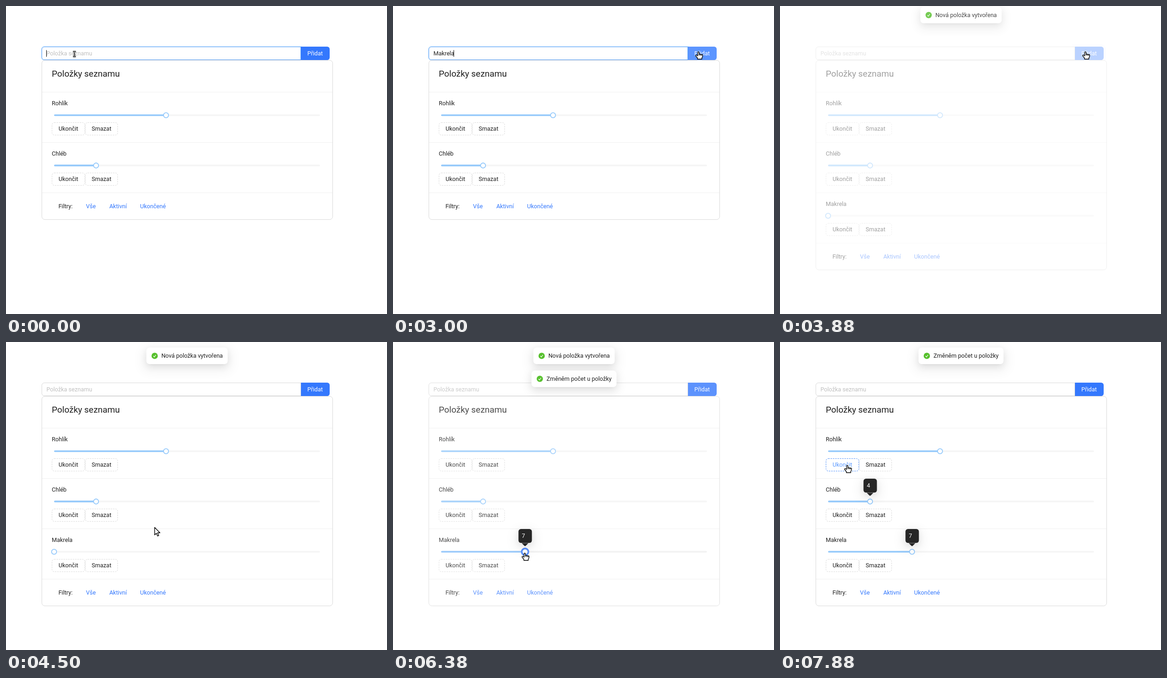
An HTML page that plays this animation: 824 px wide and 667 px high, repeating every 8 s.

```html
<!DOCTYPE html>
<html lang="cs">
<head>
<meta charset="utf-8">
<title>Položky seznamu</title>
<style>
html, body { margin: 0; width: 100%; height: 100%; overflow: hidden; background: #fff; }
svg { display: block; width: 824px; height: 667px; font: 12.6px Roboto, sans-serif; }
</style>
</head>
<body>
<svg id="stage" viewBox="0 0 824 667"></svg>
<script>
const LOOP = 8000;
const BLUE = '#3478fd', INK = '#1f1f1f', EDGE = '#d9d9d9', RULE = '#f0f0f0';
const ROW = 109;
const stage = document.getElementById('stage');

const TYPED = [[500, 'M'], [880, 'Ma'], [1130, 'Mak'], [1250, 'Makr'],
  [1380, 'Makre'], [1750, 'Makrel'], [1880, 'Makrela']];
// loading periods: start, end
const LOADS = [[3170, 3830], [5290, 6240]];
const CLICK = LOADS[0][0], ADDED = 3700, SET = LOADS[1][0];
// pointer stops: time, x, y
const PATH = [[0, 148, 104], [2440, 148, 104], [3000, 660, 99], [4130, 660, 99],
  [4500, 321, 401], [4750, 300, 463], [4960, 284.5, 457], [6850, 284.5, 457],
  [7000, 267, 433], [7400, 199, 343], [7750, 145, 267], [8000, 145, 267]];

const clamp = v => Math.max(0, Math.min(1, v));

function bezier(x1, y1, x2, y2) {
  const at = (a, b, u) => 3 * a * u * (1 - u) ** 2 + 3 * b * u * u * (1 - u) + u ** 3;
  return v => {
    const x = clamp(v);
    if (x === 0 || x === 1) return x;
    let lo = 0, hi = 1;
    for (let i = 0; i < 24; i++) {
      const mid = (lo + hi) / 2;
      if (at(x1, x2, mid) < x) lo = mid; else hi = mid;
    }
    return at(y1, y2, lo);
  };
}
const ease = bezier(.25, .1, .25, 1);
const outCirc = bezier(.08, .82, .17, 1);
const inOutCirc = bezier(.78, .14, .15, .86);

// the screen is refreshed eight times a second, on 10 ms marks
function tick(t) {
  const rest = t % 250;
  return t - rest + (rest >= 130 ? 130 : 0);
}

const rect = (x, y, w, h, r, attrs) =>
  `<rect x="${x}" y="${y}" width="${w}" height="${h}" rx="${r}" ${attrs}/>`;
const text = (x, y, s, fill = INK, attrs = '') =>
  `<text x="${x}" y="${y}" fill="${fill}" ${attrs}>${s}</text>`;
const path = (d, attrs) => `<path d="${d}" ${attrs}/>`;
const group = (attrs, body) => `<g ${attrs}>${body}</g>`;
const rule = y => path(`M78 ${y}H706`, `stroke="${RULE}"`);

function shadow(x, y, w, h, r) {
  const layer = (dy, blur, grow, alpha) => rect(x - grow, y + dy - grow, w + 2 * grow, h + 2 * grow,
    r, `style="filter:blur(${blur}px)" opacity="${alpha}"`);
  return layer(5.4, 7.2, 0, .08) + layer(2.7, 2.7, -3.6, .12) + layer(8.1, 12.6, 7.2, .05);
}

function pageOpacity(t) {
  let e = 0;
  for (const [start, end] of LOADS)
    if (t >= start) e = t < end ? ease((t - start) / 300) : 1 - ease((t - end) / 300);
  return (1 - .5 * e) * (1 - .4 * e);
}

function form(t, hover) {
  const focused = t < CLICK;
  const entry = focused ? TYPED.filter(([at]) => t >= at).pop() : null;
  const outline = 'M637.5 88.5H82.9A5.4 5.4 0 0 0 77.5 93.9V111.1A5.4 5.4 0 0 0 82.9 116.5H637.5Z';
  const button = 'M637 88H694.6A5.4 5.4 0 0 1 700 93.4V111.6A5.4 5.4 0 0 1 694.6 117H637Z';
  let out = '';
  if (focused) out += path(outline, 'fill="none" stroke="#0591ff" stroke-opacity=".1" stroke-width="4.6"');
  if (!focused && t < CLICK + 2000) {
    const grow = 5.4 * outCirc((t - CLICK) / 400);
    const alpha = .2 * (1 - outCirc((t - CLICK) / 2000));
    out += path(button, `fill="none" stroke="${BLUE}" stroke-opacity="${alpha}" stroke-width="${2 * grow}"`);
  }
  out += path(button, `fill="${hover ? '#5c95ff' : BLUE}"`);
  out += path(outline, `fill="#fff" stroke="${focused ? '#4a97f7' : EDGE}"`);
  out += entry ? text(87.5, 107, entry[1], INK, 'id="entry"') : text(87.5, 107, 'Položka seznamu', '#bfbfbf');
  if (focused) out += '<path id="caret" d="M87.5 95.5V110" stroke="#000"/>';
  return out + text(668.5, 107, 'Přidat', '#fff', 'text-anchor="middle"');
}

const sliderX = value => 104 + (value - 1) * 575 / 19;

function dashed(x, w, y, label, hot) {
  return rect(x, y, w, 27, 5, `fill="none" stroke="${hot ? '#4a8cfb' : EDGE}" stroke-dasharray="3 2"`) +
    text(x + w / 2, y + 17.5, label, hot ? '#5c9aff' : INK, 'text-anchor="middle"');
}

function item(i, name, value, state, hotButton) {
  const y = i * ROW, x = sliderX(value), cy = 236.5 + i * 108.9;
  const tint = state ? '#82bdfb' : '#94c9fb';
  const active = state === 'active';
  const bar = (to, fill) => rect(104, cy - 1.8, to - 104, 3.6, 1.8, `fill="${fill}"`);
  const knob = active
    ? `<circle cx="${x}" cy="${cy}" r="7.2" fill="#fff" stroke="${BLUE}" stroke-width="3.6"/>`
    : `<circle cx="${x}" cy="${cy}" r="5.4" fill="#fff" stroke="${tint}" stroke-width="1.8"/>`;
  return rule(186.5 + y) + text(99, 215 + y, name) + bar(679, state ? '#f0f0f0' : '#f5f5f5') +
    bar(x, tint) + knob +
    dashed(99.5, 71, 252.5 + y, 'Ukončit', hotButton) + dashed(171.5, 70, 252.5 + y, 'Smazat');
}

function card(t) {
  const added = t >= ADDED, rows = added ? 3 : 2, y = 186.5 + rows * ROW;
  let state = '';
  if (t >= 6240 && t < 7000) state = 'active';
  else if (t >= 4880 && t < 7130) state = 'hover';
  return rect(77.5, 117.5, 629, y - 117.5 + 58, 6.7, `fill="#fff" stroke="${EDGE}"`) +
    text(99, 153, 'Položky seznamu', INK, 'font-size="18.9"') +
    item(0, 'Rohlík', 9, '', t >= 7750) +
    item(1, 'Chléb', 4, t >= 7380 && t < 7500 ? 'hover' : '') +
    (added ? item(2, 'Makrela', t >= SET ? 7 : 1, state) : '') +
    rule(y) + text(113.4, y + 33.5, 'Filtry:') + text(173, y + 33.5, 'Vše', BLUE) +
    text(223.4, y + 33.5, 'Aktivní', BLUE) + text(290, y + 33.5, 'Ukončené', BLUE);
}

function spinner(t) {
  const load = LOADS.find(([start, end]) => t >= start && t < end);
  if (!load) return '';
  const age = t - load[0];
  let dots = '';
  for (let i = 0; i < 4; i++) {
    const a = (270 + i * 90 + age * .3) * Math.PI / 180;
    const beat = Math.max(0, age / 1000 - i * .4) % 2;
    const alpha = .3 + .7 * (beat < 1 ? beat : 2 - beat);
    dots += `<circle cx="${392 + 6.7 * Math.cos(a)}" cy="${259.2 + 6.7 * Math.sin(a)}" r="3.2" fill="${BLUE}" opacity="${alpha}"/>`;
  }
  return dots + text(391.5, 287, 'Načítám data...', BLUE, 'text-anchor="middle"');
}

function tooltip(value, row) {
  const x = sliderX(value) - 14.2, y = 187 + row * ROW;
  return shadow(x, y, 29, 30, 5.4) + rect(x, y, 29, 30, 5.4, 'fill="#262626"') +
    path(`M${x + 7} ${y + 30.5}h14.4l-5.6 5.8q-1.6 1.4-3.2 0z`, 'fill="#262626"') +
    text(x + 7.2, y + 19, value, '#fff');
}

function toast(label, x, w, y, alpha) {
  if (alpha <= 0) return '';
  return group(`opacity="${alpha}" transform="translate(${x} ${y})"`,
    shadow(0, 0, w, 36, 7.2) + rect(0, 0, w, 36, 7.2, 'fill="#fff"') +
    '<circle cx="18" cy="18" r="6.8" fill="#56c02c"/>' +
    path('M15.2 18.2l2 2.3 3.6-4.7', 'fill="none" stroke="#fff" stroke-width="1.2"') +
    text(32.4, 22.2, label));
}

function toasts(t) {
  const entered = at => inOutCirc((t - at) / 300);
  const rise = p => -7.2 * (1 - p) - (36 + 14.4 * p) * (1 - p);
  const a = entered(ADDED), b = entered(6110), gone = entered(6700);
  const slot = Math.min(36.6 + 14.4 * (1 - gone), 135 * (1 - gone));
  return toast('Nová položka vytvořena', 303.5, 176, 12 + rise(a) - 7.2 * gone, a * (1 - gone)) +
    toast('Změněm počet u položky', 299.5, 184, 12 + slot + rise(b), b);
}

function pointer(t) {
  const i = PATH.findIndex(([at]) => at > t);
  const [t0, x0, y0] = PATH[i - 1], [t1, x1, y1] = PATH[i];
  const k = (t - t0) / (t1 - t0);
  return [x0 + (x1 - x0) * k, y0 + (y1 - y0) * k];
}

function cursor(kind, x, y) {
  const at = `transform="translate(${x} ${y})"`;
  if (kind === 'beam') {
    const d = 'M-3.2-5.3H-1L0-4.5L1-5.3H3.2M0-4.5V4.9M-3.2 5.7H-1L0 4.9L1 5.7H3.2';
    return group(at + ' fill="none"', path(d, 'stroke="#000" stroke-width="2.8"') +
      path(d, 'stroke="#fff" stroke-width=".8"'));
  }
  const style = 'fill="#fff" stroke="#000" stroke-width="1.4" stroke-linejoin="round"';
  if (kind === 'hand')
    return group(at, path('M-1 2V9L-3 7.5C-5 6.5-6 8-5 9.5L-1.5 13.5V16H8V13.5C9.4 11.6 9.8 10.5 9.8 7.5' +
      'C9.8 5.5 7.6 5.5 7.4 7C7.2 5 5 5 4.8 6.5C4.5 4.8 2.2 5 2 6V2C2-.3-1-.3-1 2Z', style) +
      path('M2 6V8.5M4.8 6.5V8.8M7.4 7V9', 'stroke="#000"'));
  return group(at, path('M.5.5V16.7L4.2 13.2L6.8 19.2L9.4 18L6.8 12.2H12Z', style));
}

function draw(t) {
  const [x, y] = pointer(t);
  const loading = LOADS.some(([start, end]) => t >= start && t < end);
  const onButton = !loading && x > 637 && x < 700 && y > 87 && y < 117;
  const onSlider = x > 98 && x < 685 && (Math.abs(y - 345) < 7 || Math.abs(y - 454) < 7);
  let kind = 'arrow';
  if (t < CLICK && x <= 637) kind = 'beam';
  else if (!loading && (onButton || onSlider || t >= 7750)) kind = 'hand';

  stage.innerHTML = group(`opacity="${pageOpacity(t)}"`, form(t, onButton) + card(t)) +
    spinner(t) + (t >= SET ? tooltip(7, 2) : '') + (t >= 7380 ? tooltip(4, 1) : '') +
    toasts(t) + cursor(kind, x, y);

  const entry = document.getElementById('entry'), caret = document.getElementById('caret');
  if (entry && caret) {
    const end = Math.floor(87.5 + entry.getComputedTextLength()) - .5;
    caret.setAttribute('d', `M${end} 95.5V110`);
  }
}

let shown = -1;
function frame(now) {
  const t = tick(now % LOOP);
  if (t !== shown) draw(shown = t);
  requestAnimationFrame(frame);
}
draw(0);
requestAnimationFrame(frame);
</script>
</body>
</html>
```
